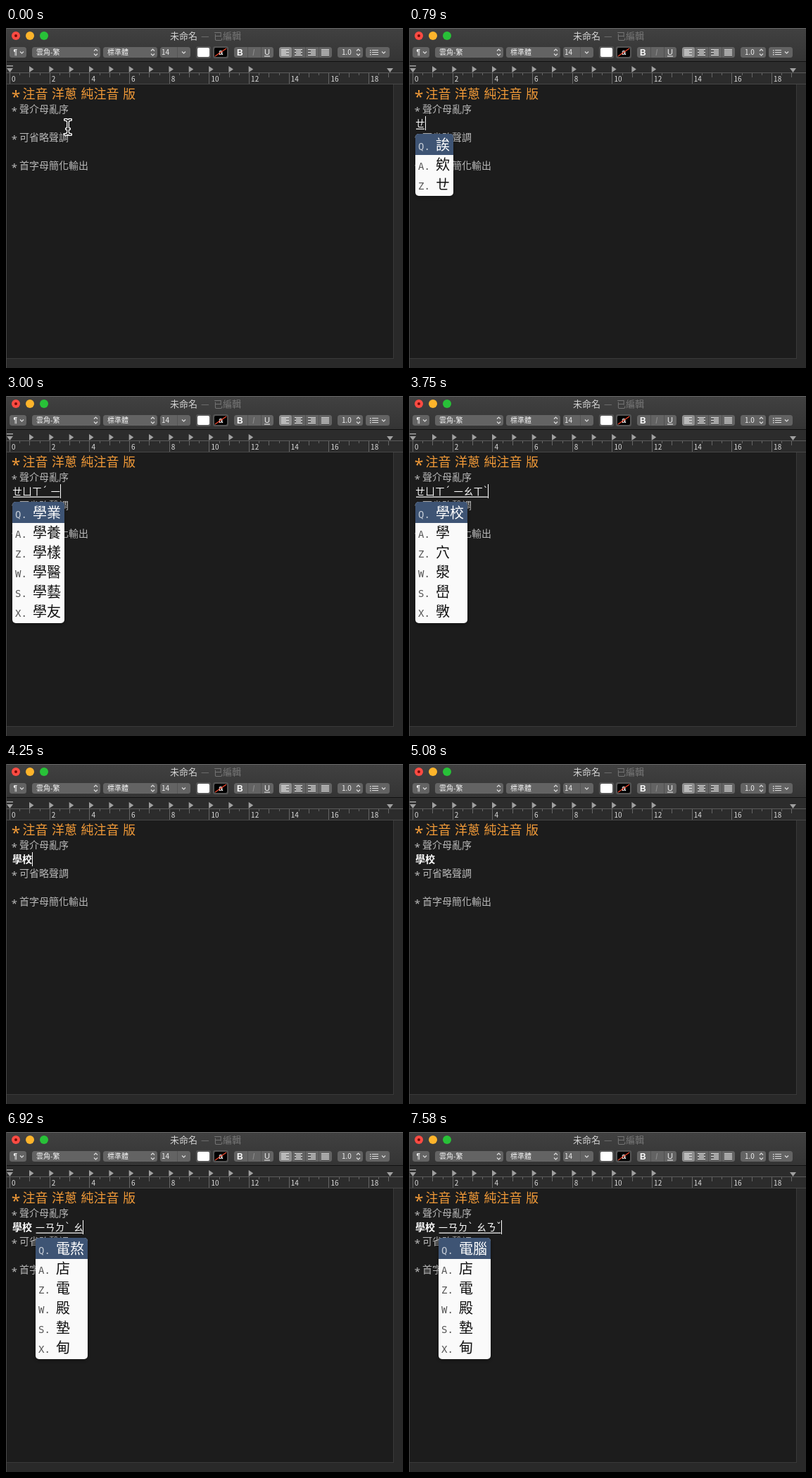
These frames come from a looping animation (564x482 px, 8 s). An HTML page:

```html
<!DOCTYPE html>
<html lang="zh-Hant">
<head>
<meta charset="utf-8">
<title>注音輸入</title>
<style>
html, body { margin: 0; width: 100%; height: 100%; overflow: hidden; background: #1e1e1e; }
svg { display: block; }
text { font-family: 'Noto Sans CJK TC', 'Noto Sans CJK JP', sans-serif; white-space: pre; }
.mono { font-family: 'DejaVu Sans Mono', monospace; }
.star { font-family: 'Noto Sans', sans-serif; }
.latin { font-family: 'Liberation Sans', sans-serif; }
.head { word-spacing: 1.5px; }
</style>
</head>
<body>
<svg width="564" height="482" viewBox="0 0 564 482">
  <defs>
    <linearGradient id="bar" x2="0" y2="1"><stop stop-color="#414141"/><stop offset="1" stop-color="#343434"/></linearGradient>
    <filter id="shade" x="-30%" y="-10%" width="160%" height="125%"><feDropShadow dx="0" dy="2" stdDeviation="3" flood-opacity=".35"/></filter>
  </defs>
  <g id="frame"></g>
  <g id="page"></g>
  <g id="input"></g>
  <g id="mouse" stroke-linecap="round" fill="none">
    <path id="beam" d="M84 130Q88 130 88 133V148Q88 151 84 151M92 130Q88 130 88 133M88 148Q88 151 92 151M86 143H90" stroke="#fff" stroke-width="4"/>
    <use href="#beam"/>
    <path d="M84 130Q88 130 88 133V148Q88 151 84 151M92 130Q88 130 88 133M88 148Q88 151 92 151M86 143H90" stroke="#111" stroke-width="1.4"/>
  </g>
</svg>
<script>
const $ = id => document.getElementById(id);
const rect = (x, y, w, h, fill, more = '') =>
  `<rect x="${x}" y="${y}" width="${w}" height="${h}" fill="${fill}" ${more}/>`;
const text = (x, y, size, fill, str, more = '') =>
  `<text x="${x}" y="${y}" font-size="${size}" fill="${fill}" ${more}>${str}</text>`;
const line = (d, stroke, width = 1, more = '') =>
  `<path d="${d}" fill="none" stroke="${stroke}" stroke-width="${width}" ${more}/>`;
const shape = (d, fill) => `<path d="${d}" fill="${fill}"/>`;
const disc = (x, y, r, fill) => `<circle cx="${x}" cy="${y}" r="${r}" fill="${fill}"/>`;

function titleBar() {
  const bold = 'font-weight="500"';
  return rect(0, 0, 564, 48, 'url(#bar)') + rect(0, 0, 564, 1, '#666') +
    disc(14, 11, 6, '#fe4b43') + disc(14, 11, 2, '#7a0a06') +
    disc(34, 11, 6, '#fdb42b') + disc(54, 11, 6, '#28c138') +
    text(233, 16, 13, '#d2d2d2', '未命名', bold) +
    text(277, 16, 13, '#777', '—') +
    text(295, 16, 13, '#777', '已編輯');
}

const chevron = x => line(`M${x} 33.5l2.5 2.5 2.5-2.5`, '#ddd', 1.2);
const stepper = x => line(`M${x} 32.5l2.5-2.5 2.5 2.5M${x} 36.5l2.5 2.5 2.5-2.5`, '#ddd', 1.2);

function toolbar() {
  const label = (x, str, more = 'font-weight="500"') => text(x, 38.3, 10, '#f2f2f2', str, more);
  const boxes = [[5, 24], [37, 97], [138, 77], [219, 43], [324, 56], [388, 75], [471, 36], [511, 34]];
  let out = boxes.map(([x, w]) => rect(x, 27, w, 15, '#636363', 'rx="3.5"')).join('');
  out += label(10.5, '¶', 'class="latin" font-weight="700"') + chevron(20) +
    label(43, '雲角-繁') + stepper(125) + label(144, '標準體') + stepper(206) +
    label(221, '14') + chevron(250) + label(477, '1.0') + stepper(498) + chevron(534);
  out += rect(243, 27, 1, 15, '#555');

  // colour wells
  out += rect(270, 26, 21, 17, '#555', 'rx="3"') + rect(272, 28, 17, 13, '#fff', 'rx="2"') +
    rect(294, 26, 22, 17, '#555', 'rx="3"') + rect(296, 28, 18, 13, '#000', 'rx="2"') +
    text(302, 38, 11, '#fff', 'a', 'class="latin" font-weight="700"') + line('M297 40L313 29', '#f04a30', 1.3);

  // style and alignment
  out += rect(343, 27, 1, 15, '#505050') + rect(362, 27, 1, 15, '#505050') +
    text(328, 39, 12, '#fff', 'B', 'class="latin" font-weight="700"') +
    text(350, 39, 12, '#8b8b8b', 'I', 'class="latin" font-style="italic"') +
    text(367, 38, 11, '#eee', 'U', 'class="latin"') + rect(367, 39.5, 8, 1, '#eee') +
    rect(388, 27, 18, 15, '#8d8d8d', 'rx="3.5"');
  [391, 410, 429, 448].forEach((x, i) => {
    if (i) out += rect(x - 4, 27, 1, 15, '#505050');
    for (let k = 0; k < 5; k++) {
      const w = i == 3 || k % 2 == 0 ? 11 : 7;
      out += rect(x + (11 - w) * [0, .5, 1, 0][i], 30 + 2 * k, w, 1, '#e6e6e6');
    }
  });
  for (let k = 0; k < 3; k++)
    out += rect(517, 31 + 3 * k, 1.5, 1.5, '#ddd') + rect(520, 31 + 3 * k, 9, 1, '#ddd');
  return out;
}

function ruler() {
  const grey = '#a0a0a0', cm = 28.34;
  let out = rect(0, 47, 564, 1, '#111') + rect(0, 48, 564, 32, '#2c2c2c') +
    rect(0, 63, 564, 1, '#5a5a5a') + rect(0, 79, 564, 1, '#474747');
  for (let k = 0; k < 39; k++) {
    const h = k % 4 == 0 ? 15 : k % 2 == 0 ? 6 : 3;
    out += rect(Math.round(5 + k * cm / 2), 64, 1, h, '#666');
    if (k % 4 == 0) out += text((8 + k * cm / 2).toFixed(1), 76, 10, '#e0e0e0', k / 2);
  }
  for (let k = 0; k < 12; k++)
    out += shape(`M${(33 + k * cm).toFixed(1)} 54l6.5 4.5-6.5 4.5z`, grey);
  return out + rect(1, 53, 9, 1.5, grey) + shape('M1 57h9l-4.5 6z', grey) + shape('M541 57h9l-4.5 6z', grey);
}

$('frame').innerHTML = rect(0, 0, 564, 482, '#292929') + titleBar() + toolbar() + ruler() +
  rect(0, 80, 550, 388, '#1c1c1c') + rect(550, 80, 1, 389, '#3a3a3a') +
  rect(0, 468, 551, 1, '#3a3a3a') + rect(0, 0, 1, 482, '#484848');

const note = (y, str) => text(12, y + 3.4, 15, '#b8b8b8', '*', 'class="star" text-anchor="middle"') +
  text(19, y, 14, '#b8b8b8', str);
$('page').innerHTML =
  text(14, 105.6, 23, '#f19a38', '*', 'class="star" text-anchor="middle"') +
  text(23.5, 99.5, 18, '#f19a38', '注音 洋蔥 純注音 版', 'class="head" font-weight="500"') +
  note(120, '聲介母亂序') + note(160, '可省略聲調') + note(200, '首字母簡化輸出');

// start ms, committed text, composing text, candidates, caret shown
const steps = [
  [0, '', '', '', 0],
  [330, '', '', '', 1],
  [750, '', 'ㄝ', '誒 欸 ㄝ', 1],
  [960, '', 'ㄝㄩ', '月 越 約 樂 閱 躍', 1],
  [1250, '', 'ㄝㄩㄒ', '學 血 雪 薛 穴 靴', 1],
  [1790, '', 'ㄝㄩㄒ', '學 血 雪 薛 穴 靴', 0],
  [2000, '', 'ㄝㄩㄒ', '學 血 雪 薛 穴 靴', 1],
  [2380, '', 'ㄝㄩㄒˊ', '學 穴 澩 嶨 斆 鷽', 1],
  [3000, '', 'ㄝㄩㄒˊ 一', '學業 學養 學樣 學醫 學藝 學友', 1],
  [3420, '', 'ㄝㄩㄒˊ 一ㄠ', '學要 學 穴 澩 嶨 斆', 1],
  [3580, '', 'ㄝㄩㄒˊ 一ㄠㄒ', '學校 學 穴 澩 嶨 斆', 1],
  [3750, '', 'ㄝㄩㄒˊ 一ㄠㄒˋ', '學校 學 穴 澩 嶨 斆', 1],
  [4000, '學校', '', '', 1],
  [4500, '學校 ', '', '', 1],
  [5000, '學校 ', '', '', 0],
  [5130, '學校 ', '一', '一 以 已 意 易 醫', 1],
  [5420, '學校 ', '一ㄢ', '言 眼 煙 演 嚴 驗', 1],
  [5920, '學校 ', '一ㄢㄉ', '點 店 電 一旦 殿 墊', 1],
  [6330, '學校 ', '一ㄢㄉˋ', '店 電 殿 墊 甸 奠', 1],
  [6670, '學校 ', '一ㄢㄉˋ', '店 電 殿 墊 甸 奠', 0],
  [6920, '學校 ', '一ㄢㄉˋ ㄠ', '電熬 店 電 殿 墊 甸', 1],
  [7250, '學校 ', '一ㄢㄉˋ ㄠㄋ', '電腦 電鬧 店 電 殿 墊', 1],
  [7580, '學校 ', '一ㄢㄉˋ ㄠㄋˇ', '電腦 店 電 殿 墊 甸', 1]
];

const isTone = c => 'ˊˋˇ'.includes(c);
const advance = c => c == ' ' ? 4.6 : isTone(c) ? 7.6 : 14;

// lays out characters from x and returns markup with the end position
function run(x, str, weight) {
  let out = '';
  for (const c of str) {
    const w = advance(c), more = `text-anchor="middle" font-weight="${weight}"`;
    if (isTone(c)) out += text(x + w / 2, 139, 14, '#fff', c, more + ' style="font-family:\'DejaVu Sans\',sans-serif"');
    else if (c != ' ') out += text(x + w / 2, 140, c == '一' ? 13 : 14, '#fff', c, more);
    x += w;
  }
  return [out, x];
}

function popup(x, words) {
  const wide = Math.max(...words.map(w => w.length)), w = 34 + 20 * wide, h = 4 + 28 * words.length;
  let out = rect(x, 150, w, h, '#fafafa', 'rx="5" filter="url(#shade)"') +
    shape(`M${x} 180v-25q0-5 5-5h${w - 10}q5 0 5 5v25z`, '#3e5474');
  words.forEach((word, i) => {
    const y = 173.4 + 28 * i;
    out += text(x + 4, y, 14, i ? '#555' : '#c3cad4', 'QAZWSX'[i] + '.', 'class="mono"') +
      text(x + 29, y, 20, i ? '#111' : '#fff', word);
  });
  return out;
}

function show([, done, typed, words, caret]) {
  const [doneMarkup, start] = run(9, done, 700);
  const [typedMarkup, end] = run(start, typed, 500);
  let out = doneMarkup + typedMarkup;
  if (typed) out += rect(start + 1, 142.5, end - start - 2, 1.3, '#eee');
  if (caret) out += rect(Math.floor(end), 125, 1, 20, '#fff');
  if (words) out += popup(Math.round(start), words.split(' '));
  $('input').innerHTML = out;
}

let shown, begin;
function tick(now) {
  begin ??= now;
  const t = (now - begin) % 8000;
  const step = steps.findLast(s => s[0] <= t);
  if (step != shown) {
    show(shown = step);
    $('mouse').style.display = t < 750 ? '' : 'none';
  }
  requestAnimationFrame(tick);
}
show(steps[0]);
requestAnimationFrame(tick);
</script>
</body>
</html>
```
